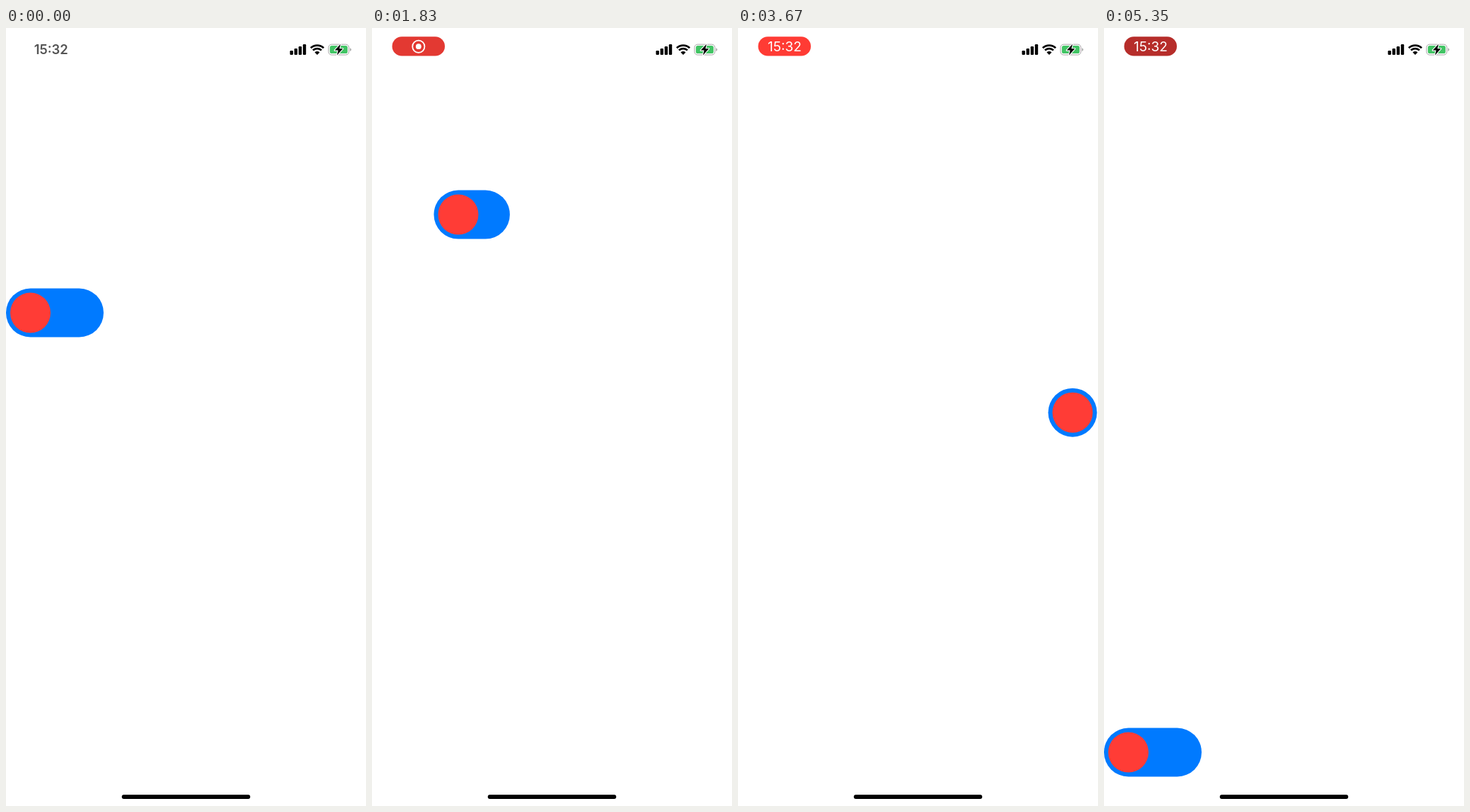
These frames come from a looping animation (509x1101 px, 5.4 s). An HTML page:

```html
<!DOCTYPE html>
<html lang="en">
<head>
<meta charset="utf-8">
<title>Draggable switch</title>
<style>
  html, body { margin: 0; width: 100%; height: 100%; overflow: hidden; background: #fff; }
  svg { display: block; width: 100vw; height: 100vh; }
  text { font-family: Inter, "Liberation Sans", sans-serif; text-anchor: middle; }
</style>
</head>
<body>
<svg viewBox="0 0 509 1101">
  <g id="switch">
    <rect id="track" y="-34.5" width="138" height="69" rx="34.5" fill="#007aff"/>
    <circle cx="34.5" r="28.5" fill="#ff3c36"/>
  </g>

  <text id="clock" x="63.7" y="37.2" font-size="18.4" font-weight="600" fill="#545454">15:32</text>
  <g id="badge" opacity="0">
    <rect id="pill" x="28.5" y="12.3" width="74.5" height="27.2" rx="13.6"/>
    <text id="time" x="66" y="32.9" font-size="19.1" fill="#fff">15:32</text>
    <g id="record" fill="#fff">
      <circle cx="65.8" cy="26.2" r="8.6" fill="none" stroke="#fff" stroke-width="1.8"/>
      <circle cx="65.8" cy="26.2" r="3.9"/>
    </g>
  </g>

  <g id="bars"></g>
  <g fill="none" stroke="#000" stroke-width="2.8">
    <path d="M430.9 28.2A13.4 13.4 0 0 1 449.1 28.2"/>
    <path d="M434 31.5A8.8 8.8 0 0 1 446 31.5"/>
  </g>
  <path d="M440 38L436.5 34.4A5 5 0 0 1 443.5 34.4Z"/>

  <rect x="456" y="23.2" width="28.8" height="14.8" rx="4.3" fill="none" stroke="#a3a3a3"/>
  <path d="M486.4 28.2Q488.2 28.8 488.2 30.6T486.4 33Z" fill="#a3a3a3"/>
  <rect x="457.9" y="25.1" width="25" height="11" rx="2.6" fill="#41c464"/>
  <path d="M473 22.7L464.8 31.6H469.6L468 38.5L476.3 29.3H471.4Z"
        stroke="#fff" stroke-width="2.2" paint-order="stroke" stroke-linejoin="round"/>

  <rect x="163.7" y="1085" width="181.6" height="6" rx="3"/>
</svg>
<script>
const LOOP = 5400, FRAME = 1000 / 30;
const SNAP = 300, RESIZE = 200;
const SMALL = 69, LARGE = 138;
const RIGHT = 509 - SMALL, BOTTOM = 1025;

const $ = id => document.getElementById(id);
const set = (id, name, value) => $(id).setAttribute(name, value);
const mix = (a, b, k) => a + (b - a) * k;
const ramp = (t, from, ms) => Math.min(1, Math.max(0, (t - from) / ms));
const power = n => p => p ** n;
const rgb = c => `rgb(${c.map(Math.round)})`;

// cubic-bezier(.42, 0, .58, 1), solved with Newton steps
function easeInOut(p) {
  let s = p;
  for (let i = 0; i < 4; i++) {
    s -= (s * (1.26 - s * (0.78 - 0.52 * s)) - p) / (1.26 - 1.56 * s * (1 - s));
  }
  return s * s * (3 - 2 * s);
}

const move = (at, ms, x, y, ease = easeInOut, arc = 0) => ({ at, ms, x, y, ease, arc });

const moves = [
  move(740, 289, 293, 212),
  move(1029, SNAP, 0, 212),
  move(1740, 281, 380, 438),
  move(2021, SNAP, 0, 438),
  move(2736, 394, RIGHT, 452, power(1.13), -9.6),
  move(3130, 950, 431, BOTTOM, power(3.2)),
  move(4080, 190, 413, BOTTOM),
  move(4410, SNAP, 0, BOTTOM)
];
const touches = [[740, 1029], [1740, 2021], [2736, 4410]];

function position(t) {
  let x = 0, y = 403;
  for (const m of moves) {
    const k = m.ease(ramp(t, m.at, m.ms));
    x = mix(x, m.x, k);
    y = mix(y, m.y, k) + m.arc * Math.sin(Math.PI * k);
  }
  return [x, y];
}

function width(t) {
  const grip = touches.reduce((sum, [down, up]) =>
    sum + easeInOut(ramp(t, down, RESIZE)) - easeInOut(ramp(t, up, RESIZE)), 0);
  return mix(LARGE, SMALL, grip);
}

function pillColor(t) {
  const glow = ramp(t, 1770, 300) - ramp(t, 2590, 170) + ramp(t, 2900, 220) - ramp(t, 5140, 20);
  const press = ramp(t, 5310, 35);
  const dim = [220, 56, 50], lit = [255, 59, 52], pressed = [163, 40, 38];
  return rgb(dim.map((c, i) => mix(mix(c, lit[i], glow), pressed[i], press)));
}

function draw(t) {
  set('switch', 'transform', `translate(${position(t)})`);
  set('track', 'width', width(t));
  set('clock', 'opacity', 1 - ramp(t, 15, 215));
  set('badge', 'opacity', ramp(t, 15, 425));
  set('pill', 'fill', pillColor(t));
  set('time', 'opacity', 1 - ramp(t, 760, 170) + ramp(t, 3250, 200));
  set('record', 'opacity', ramp(t, 800, 200) - ramp(t, 3160, 170));
}

for (let i = 0; i < 4; i++) {
  const h = 6 + 2.97 * i;
  $('bars').innerHTML +=
    `<rect x="${401.5 + 6.1 * i}" y="${38 - h}" width="4.4" height="${h}" rx="1.2"/>`;
}

let start;
function tick(now) {
  start ??= now;
  // The motion runs at 30 frames a second
  draw(Math.floor(((now - start) % LOOP + 8) / FRAME) * FRAME);
  requestAnimationFrame(tick);
}
draw(0);
requestAnimationFrame(tick);
</script>
</body>
</html>
```
